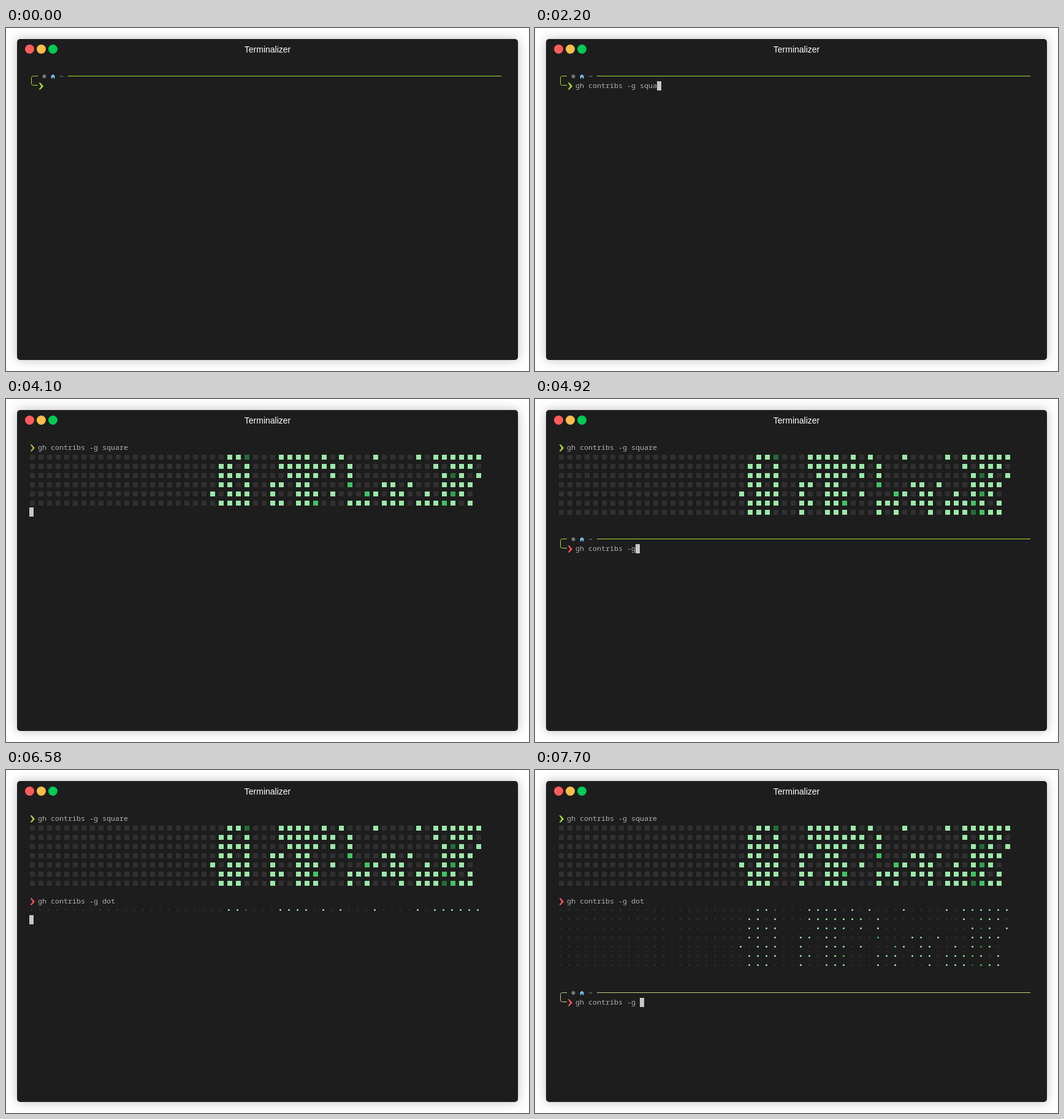
Animation, 853 px wide and 560 px high, one loop 8 s. Source, as an HTML page:

```html
<!DOCTYPE html>
<html lang="en">
<head>
<meta charset="utf-8">
<title>Terminal</title>
<style>
  html, body { margin: 0; width: 100%; height: 100%; overflow: hidden; background: #fff; }
  #window {
    position: absolute; left: 18px; top: 18px; width: 817px; height: 524px;
    border-radius: 5px; background: #1d1d1d; box-shadow: 0 0 18px rgba(0, 0, 0, .25);
  }
  svg { position: absolute; left: 0; top: 0; display: block; }
  text { white-space: pre; fill: #afafaf; font: 11.667px "Noto Sans Mono", monospace; font-variant-ligatures: none; }
  .title { fill: #fff; font: 14px "Liberation Sans", Arial, sans-serif; text-anchor: middle; }
  .tilde { fill: #87afc7; }
</style>
</head>
<body>
<div id="window"></div>
<svg id="stage" width="853" height="560" viewBox="0 0 853 560">
  <circle cx="38.5" cy="34.5" r="7.5" fill="#ff5c5c"/>
  <circle cx="57.5" cy="34.5" r="7.5" fill="#ffbd4c"/>
  <circle cx="76.5" cy="34.5" r="7.5" fill="#00ca56"/>
  <text class="title" x="426.5" y="40">Terminalizer</text>
</svg>
<script>
const LOOP = 8000, LEFT = 38, TOP = 72, CELL = 7, LINE = 15, WEEKS = 53;
const GREEN = '#a6e22e', RED = '#fa5560', GOLD = '#c0a93e', LIME = '#c6c83a', PALE = '#c3cb84';
const LEVELS = ['#303030', '#9be9a8', '#40c463', '#30a14e', '#216e39'];

// Active weeks for each weekday, then the busier days as weekday:week.
const ACTIVE = [
  '23-25 29-32 34 36 40 45 47-52',
  '22-23 25 29-35 37 47 49-51',
  '22-25 30-33 35 37 48-50 52',
  '22-23 25 28-29 31-32 37 41-42 44 48-51',
  '21 23-25 28 31-33 35 39-40 42-43 46 48-50',
  '22-25 28-29 31-33 37-39 41-43 45-49 51',
  '22-24 28 31-33 37 39 43 45-51'
];
const BUSY = { '0:25': 4, '2:49': 4, '3:37': 2, '4:39': 2, '4:49': 3, '5:33': 2, '5:48': 2, '6:48': 4, '6:49': 2 };

const BASE = 'gh contribs -g';
const SESSIONS = [
  { start: 0, row: 0, doneRow: 0, shape: 'square', enter: 3260, output: 3850, color: GREEN, line: GREEN,
    keys: [240, 490, 1190, 1620, 2060, 2200, 2550, 2670] },
  { start: 4250, row: 10, doneRow: 9, shape: 'dot', enter: 6250, output: 6580, color: RED, line: GREEN,
    keys: [4920, 4990, 5430, 5770, 5930] },
  { start: 6980, row: 19, doneRow: 18, shape: '', enter: Infinity, output: Infinity, color: RED, line: PALE,
    keys: [7630, 7700] }
];

const stage = document.getElementById('stage');

function add(tag, attrs, parent = stage) {
  const node = document.createElementNS(stage.namespaceURI, tag);
  for (const key in attrs) node.setAttribute(key, attrs[key]);
  parent.append(node);
  return node;
}

const show = (node, on) => node.setAttribute('visibility', on ? 'visible' : 'hidden');
const place = (node, col, row) =>
  node.setAttribute('transform', `translate(${LEFT + col * CELL} ${TOP + row * LINE})`);

function level(day, week) {
  const active = ACTIVE[day].split(' ').some(run => {
    const [from, to = from] = run.split('-').map(Number);
    return week >= from && week <= to;
  });
  return active ? BUSY[`${day}:${week}`] || 1 : 0;
}

function makeDay(day, session) {
  const group = add('g', {});
  place(group, 0, session.doneRow + 1 + day);
  for (let week = 0; week < (day < 3 ? WEEKS : WEEKS - 1); week++) {
    const rank = level(day, week), x = week * 2 * CELL, fill = LEVELS[rank];
    if (session.shape === 'square') add('rect', { x: x + 1, y: 4, width: 8, height: 8, fill }, group);
    else add('circle', { cx: x + 3.5, cy: 6.5, r: 1.5, fill }, group);
  }
  return group;
}

function makePrompt({ row, line }) {
  const group = add('g', {});
  place(group, 0, row);
  add('path', { d: 'M14 6.5H6.5Q3.5 6.5 3.5 9.5V18.5Q3.5 21.5 6.5 21.5H14M63 6.5H770',
    fill: 'none', stroke: line }, group);
  add('circle', { cx: 24.5, cy: 7, r: 3, fill: '#777' }, group);
  add('path', { d: 'M38.5 3.5L42.3 7H41.4V10.5H39.5V8.2H37.6V10.5H35.7V7H34.8Z', fill: '#74c5ec' }, group);
  add('text', { x: 49, y: 11, class: 'tilde' }, group).textContent = '~';
  return group;
}

for (const s of SESSIONS) {
  s.prompt = makePrompt(s);
  s.mark = add('path', { d: 'M1.5 2.3H3.9L9 7.9L3.9 13.4H1.5L5.5 7.9Z' });
  s.command = add('text', { y: 11 });
  s.days = s.shape ? ACTIVE.map((_, day) => makeDay(day, s)) : [];
}
const cursor = add('rect', { width: CELL, height: LINE, fill: '#c7c7c7' });

function markColor(index, t) {
  if (index === 0 && t >= 3260 && t < 4250) return GOLD;
  if (index === 0 && t >= 6250 && t < 6980) return LIME;
  return SESSIONS[index].color;
}

function render(t) {
  show(cursor, false);
  SESSIONS.forEach((s, index) => {
    const started = t >= s.start, done = t >= s.enter;
    const typed = s.keys.filter(time => t >= time).length;
    const text = typed ? (BASE + ' ' + s.shape).slice(0, BASE.length + typed - 1) : '';
    const rows = s.days.filter((_, day) => t >= s.output + day * 50).length;
    const next = SESSIONS[index + 1];

    show(s.prompt, started && !done);
    show(s.mark, started);
    s.mark.setAttribute('fill', markColor(index, t));
    place(s.mark, done ? 0 : 2, done ? s.doneRow : s.row + 1);
    place(s.command, done ? 2 : 4, done ? s.doneRow : s.row + 1);
    if (s.command.textContent !== text) s.command.textContent = text;
    s.days.forEach((group, day) => show(group, day < rows));

    if (typed && !(next && t >= next.start)) {
      show(cursor, true);
      place(cursor, done ? 0 : 4 + text.length, done ? s.doneRow + 1 + rows : s.row + 1);
    }
  });
}

const begin = performance.now();
function tick() {
  render((performance.now() - begin) % LOOP);
  requestAnimationFrame(tick);
}
tick();
</script>
</body>
</html>
```
